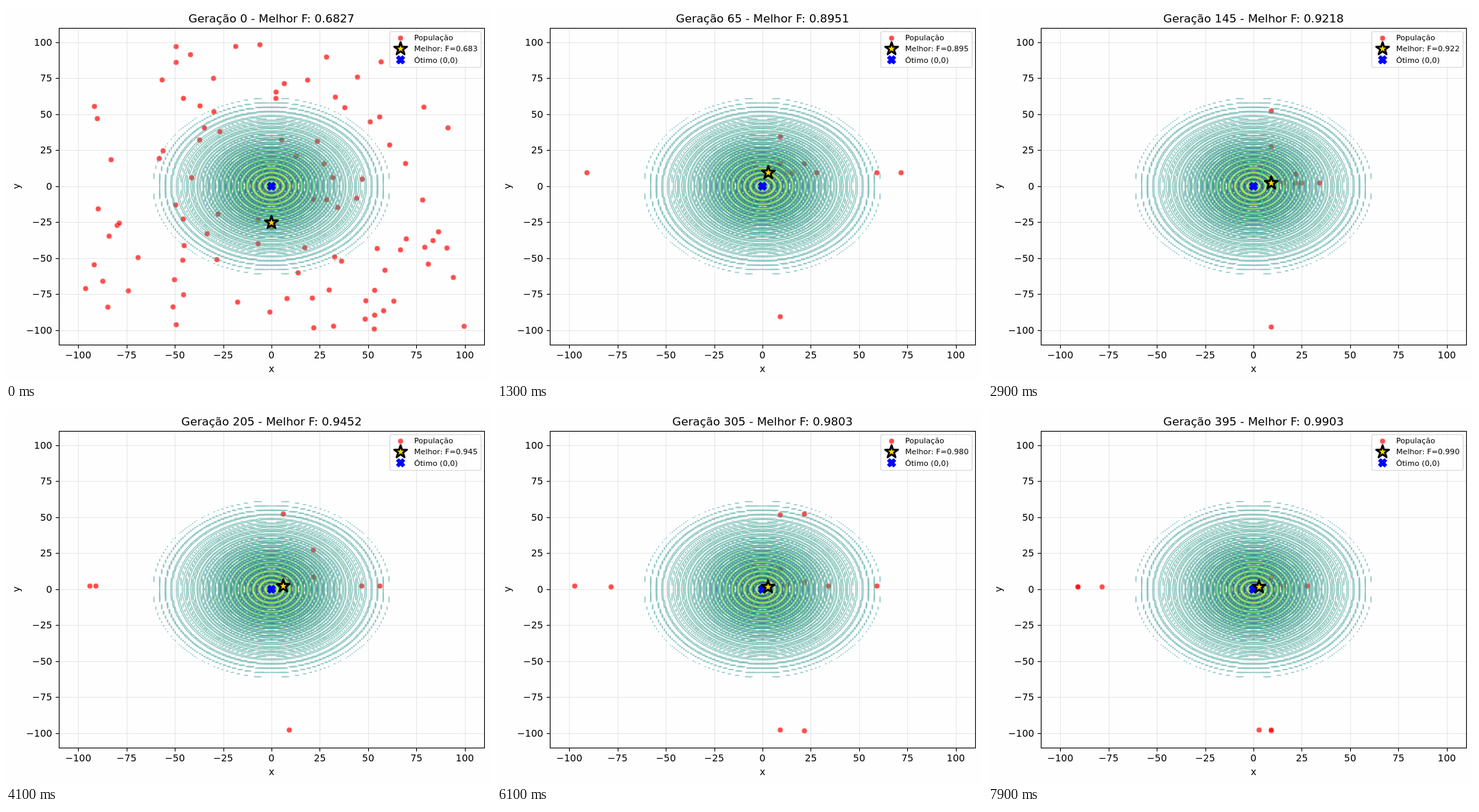
These frames come from a looping animation (707x547 px, 8 s). An HTML page with a canvas:

```html
<!DOCTYPE html>
<html lang="pt">
<head>
<meta charset="utf-8">
<style>
html, body { margin: 0; width: 100%; height: 100%; overflow: hidden; background: #fefefe; }
canvas { display: block; }
</style>
</head>
<body>
<canvas id="c" width="707" height="547"></canvas>
<script>
const W = 707, H = 547, STEP = 100, COUNT = 80;
const ctx = document.getElementById('c').getContext('2d');
const FONT = '"DejaVu Sans", sans-serif';
const LEFT = 77.5, TOP = 32.5, PW = 620, PH = 462, MID = 387;
const px = x => MID + x * PW / 220;
const py = y => 262.9 - y * PH / 220;
const snap = v => Math.floor(v + .5) + .5;

// Best individual: step, fitness, x, y
const BEST = [
  [0, .6827, 0, -25.3], [2, .7720, 3, -18.6], [5, .8725, 3, 12.2],
  [10, .8951, 3, 9.4], [15, .9218, 9.2, 2.2], [35, .9452, 6.1, 2.2],
  [50, .9719, 2.9, 1.6], [60, .9803, 2.9, 1.6], [66, .9869, 2.9, 1.6],
  [75, .9903, 2.9, 1.6]
];
const bestAt = k => BEST.filter(b => b[0] <= k).pop();

function seeded(s) {
  return () => {
    s = s + 0x6D2B79F5 | 0;
    let t = Math.imul(s ^ s >>> 15, 1 | s);
    t = t + Math.imul(t ^ t >>> 7, 61 | t) ^ t;
    return ((t ^ t >>> 14) >>> 0) / 4294967296;
  };
}

function population(k) {
  const list = [];
  const first = seeded(5), rnd = seeded(k * 97 + 11);
  // the scattered start dies out by half each step
  for (let i = 0; i < 98; i++) {
    const p = [first() * 200 - 100, first() * 200 - 100];
    if (rnd() < 2 ** -k) list.push(p);
  }
  if (!k) return list;
  // offspring: copies of good genes with one binary digit flipped
  const [, , bx, by] = bestAt(k);
  for (let i = 0; i < 11; i++) {
    const p = [rnd() < .3 ? bx : 9.2, k < 15 || rnd() < .5 ? by : 2.2];
    if (rnd() < .2) p[0] = 21.7;
    const bit = Math.floor(rnd() * 5.5);
    p[rnd() < .5 ? 0 : 1] += (bit ? 100 : -100) / 2 ** bit;
    list.push(p);
  }
  return list;
}

const VIRIDIS = [[68, 1, 84], [59, 82, 139], [33, 145, 140], [94, 201, 98], [253, 231, 37]];
function viridis(t) {
  const p = t * 4, i = Math.min(3, Math.floor(p));
  return VIRIDIS[i].map((v, j) => Math.round(v + (VIRIDIS[i + 1][j] - v) * (p - i)));
}

function fitness(x, y) {
  const r2 = x * x + y * y, s = Math.sin(Math.sqrt(r2)), d = 1 + .001 * r2;
  return .5 - (s * s - .5) / (d * d);
}

// Marching squares on a coarse grid, one path per level
function drawContours(g) {
  const n = 200, at = i => -100 + i * 200 / (n - 1);
  const z = new Float64Array(n * n);
  for (let j = 0; j < n; j++)
    for (let i = 0; i < n; i++) z[j * n + i] = fitness(at(i), at(j));
  g.lineWidth = 1.39;
  g.lineCap = 'round';
  for (let l = 1; l <= 16; l++) {
    const lev = l * .06;
    g.strokeStyle = `rgba(${viridis(l / 16)},.5)`;
    g.beginPath();
    for (let j = 0; j < n - 1; j++) for (let i = 0; i < n - 1; i++) {
      const o = j * n + i;
      const v = [z[o], z[o + 1], z[o + n + 1], z[o + n]];
      const up = v.map(a => a > lev);
      if (up[0] === up[1] && up[1] === up[2] && up[2] === up[3]) continue;
      const pts = [];
      for (let e = 0; e < 4; e++) {
        const f = (e + 1) % 4;
        if (up[e] === up[f]) continue;
        const t = (lev - v[e]) / (v[f] - v[e]);
        const cx = [t, 1, 1 - t, 0][e], cy = [0, t, 1, 1 - t][e];
        pts.push([px(at(i + cx)), py(at(j + cy))]);
      }
      if (pts.length === 4 && (v[0] + v[1] + v[2] + v[3]) / 4 > lev !== up[0])
        pts.unshift(pts.pop());
      for (let q = 0; q < pts.length; q += 2) {
        g.moveTo(...pts[q]);
        g.lineTo(...pts[q + 1]);
      }
    }
    g.stroke();
  }
}

function line(g, x1, y1, x2, y2) {
  g.beginPath();
  g.moveTo(x1, y1);
  g.lineTo(x2, y2);
  g.stroke();
}

function text(g, s, x, y, size, align) {
  g.font = `${size}px ${FONT}`;
  g.textAlign = align;
  g.fillStyle = '#000';
  g.fillText(s, x, y);
}

function dot(x, y) {
  ctx.beginPath();
  ctx.arc(x, y, 4, 0, 7);
  ctx.fillStyle = 'rgba(255,0,0,.7)';
  ctx.fill();
  ctx.strokeStyle = 'rgba(255,255,255,.7)';
  ctx.lineWidth = .7;
  ctx.stroke();
}

function shape(pts, fill, edge, width) {
  ctx.beginPath();
  pts.forEach(p => ctx.lineTo(...p));
  ctx.closePath();
  ctx.lineJoin = 'round';
  ctx.fillStyle = fill;
  ctx.fill();
  ctx.strokeStyle = edge;
  ctx.lineWidth = width;
  ctx.stroke();
}

function star(x, y) {
  const pts = [];
  for (let i = 0; i < 10; i++) {
    const r = i % 2 ? 3.74 : 9.8, a = i * Math.PI / 5;
    pts.push([x + r * Math.sin(a), y - r * Math.cos(a)]);
  }
  shape(pts, '#ffd700', '#000', 2.78);
}

function cross(x, y) {
  const pts = [], u = 2.8;
  for (let i = 0; i < 4; i++) {
    const c = [1, 0, -1, 0][i], s = [0, 1, 0, -1][i];
    for (const [a, b] of [[1, 0], [2, 1], [1, 2]])
      pts.push([x + u * (a * c - b * s), y + u * (a * s + b * c)]);
  }
  shape(pts, '#00f', '#00f', 1.8);
}

function layer(draw) {
  const c = document.createElement('canvas');
  c.width = W;
  c.height = H;
  draw(c.getContext('2d'));
  return c;
}

const field = layer(g => {
  g.strokeStyle = 'rgba(176,176,176,.28)';
  g.lineWidth = 1.1;
  for (let t = -100; t <= 100; t += 25) {
    line(g, snap(px(t)), TOP, snap(px(t)), TOP + PH);
    line(g, LEFT, snap(py(t)), LEFT + PW, snap(py(t)));
  }
  drawContours(g);
});

const axes = layer(g => {
  g.strokeStyle = '#000';
  g.lineWidth = 1.1;
  g.strokeRect(LEFT, TOP, PW, PH);
  for (let t = -100; t <= 100; t += 25) {
    const x = snap(px(t)), y = snap(py(t));
    const s = String(t).replace('-', '\u2212');
    line(g, x, TOP + PH, x, TOP + PH + 5);
    line(g, LEFT - 5, y, LEFT, y);
    text(g, s, px(t), 514, 13.89, 'center');
    text(g, s, 67.3, y + 4.5, 13.89, 'right');
  }
  text(g, 'x', MID, 534, 13.89, 'center');
  g.translate(20, 263);
  g.rotate(-Math.PI / 2);
  text(g, 'y', 0, 0, 13.89, 'center');
});

function legend(f) {
  ctx.beginPath();
  ctx.roundRect(559.5, 37.5, 133, 52, 2.5);
  ctx.fillStyle = 'rgba(255,255,255,.8)';
  ctx.fill();
  ctx.strokeStyle = 'rgba(204,204,204,.8)';
  ctx.lineWidth = 1.2;
  ctx.stroke();
  dot(575.2, 46.9);
  star(575.2, 62.5);
  cross(575.2, 78.5);
  text(ctx, 'População', 595, 50, 11.11, 'left');
  text(ctx, `Melhor: F=${f.toFixed(3)}`, 595, 66, 11.11, 'left');
  text(ctx, 'Ótimo (0,0)', 595, 83, 11.11, 'left');
}

function draw(k) {
  const [, f, bx, by] = bestAt(k);
  ctx.fillStyle = '#fefefe';
  ctx.fillRect(0, 0, W, H);
  for (const [x, y] of population(k)) dot(px(x), py(y));
  ctx.drawImage(field, 0, 0);
  cross(px(0), py(0));
  star(px(bx), py(by));
  ctx.drawImage(axes, 0, 0);
  text(ctx, `Geração ${k * 5} - Melhor F: ${f.toFixed(4)}`, MID, 24, 16.67, 'center');
  legend(f);
}

const began = performance.now();
let shown = -1;
function tick() {
  const k = Math.floor((performance.now() - began) / STEP) % COUNT;
  if (k !== shown) draw(shown = k);
  requestAnimationFrame(tick);
}
draw(shown = 0);
requestAnimationFrame(tick);
</script>
</body>
</html>
```
